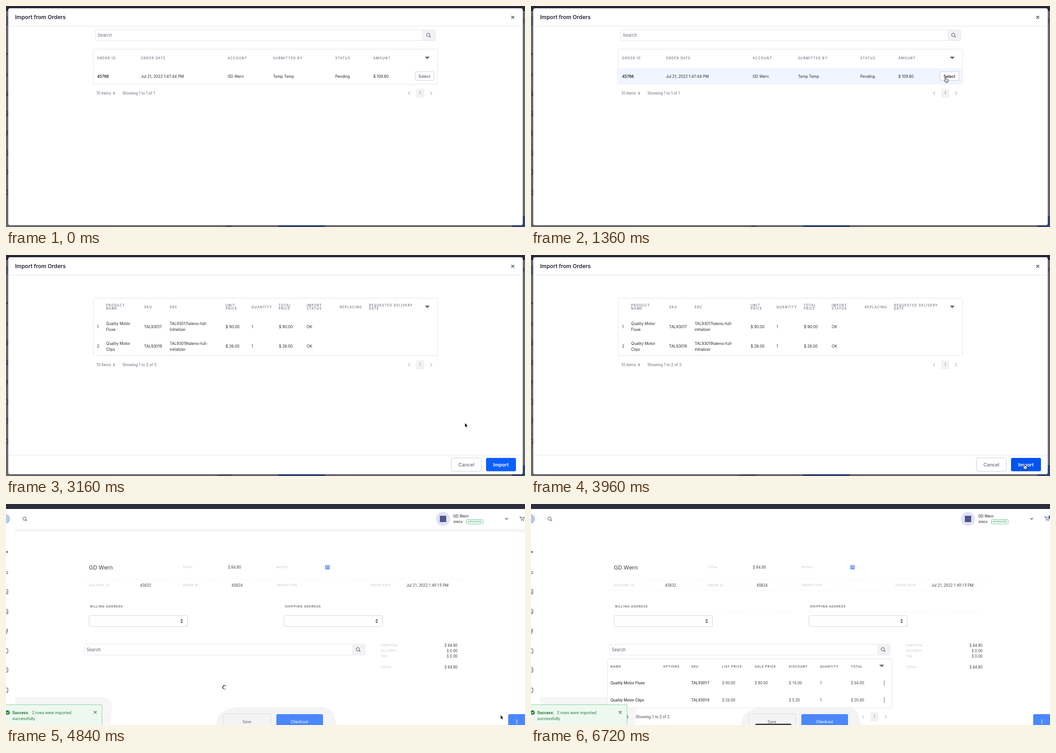
These frames come from a looping animation (1146x489 px, 6800 ms). An HTML page:

```html
<!DOCTYPE html>
<html lang="en">
<head>
<meta charset="utf-8">
<title>Import from orders</title>
<style>
html, body { margin: 0; width: 100%; height: 100%; overflow: hidden; background: #fff; }
svg { display: block; width: 100%; height: 100%; }
text { white-space: pre; }
</style>
</head>
<body>
<svg id="stage" viewBox="0 0 1146 489" preserveAspectRatio="none"></svg>
<script>
const LOOP = 6800;
const INK = '#272833', GRAY = '#6b6c7e', LINE = '#e4e4ea', BLUE = '#4b87ff', GREEN = '#287d3c';
const INTER = 'Inter, sans-serif', ROBOTO = 'Roboto, sans-serif';
const ACCOUNT = 'GD Wern';
const PRODUCTS = [['Quality Motor', 'Fluxe', 'TAL93017'], ['Quality Motor', 'Clips', 'TAL93019']];

// Text is placed by the vertical middle of its capitals.
const text = (x, y, str, size, fill = INK, { weight = 400, font = INTER, gap = 0, anchor = 'start' } = {}) =>
  `<text x="${x}" y="${y + size * 0.36}" font-family="${font}" font-size="${size}" font-weight="${weight}" fill="${fill}" letter-spacing="${gap}" text-anchor="${anchor}">${str}</text>`;
const rect = (x, y, w, h, fill, stroke = 'none', r = 0) =>
  `<rect x="${x}" y="${y}" width="${w}" height="${h}" rx="${r}" fill="${fill}" stroke="${stroke}"/>`;
const path = (d, stroke, width = 1, fill = 'none') =>
  `<path d="${d}" fill="${fill}" stroke="${stroke}" stroke-width="${width}" stroke-linecap="round" stroke-linejoin="round"/>`;
const circle = (x, y, r, fill) => `<circle cx="${x}" cy="${y}" r="${r}" fill="${fill}"/>`;
const group = (id, ...parts) => `<g id="${id}">${parts.join('')}</g>`;

const cell = (x, y, str) => text(x, y, str, 8.4);
const head = (x, y, str) => text(x, y, str, 7, GRAY, { weight: 500, gap: 1.1 });
const heads = (y, list) => list.map(([x, str]) => head(x, y, str)).join('');
const body = (x, y, str, opts = {}) => text(x, y, str, 8.7, '#4a4b55', { font: ROBOTO, ...opts });
const label = (x, y, str) => text(x, y, str, 6.7, '#c3c3ca', { font: ROBOTO, gap: 0.7 });
const caps = (x, y, str) => text(x, y, str, 7, '#5c5d69', { font: ROBOTO, weight: 500, gap: 0.95 });

const magnifier = (x, y) => path(`M${x + 2.3} ${y + 2.3}l2.2 2.2M${x + 3} ${y - .6}a3.6 3.6 0 1 1-7.2 0a3.6 3.6 0 1 1 7.2 0`, '#4f505c', 1.1);
const cross = (x, y, r, color) => path(`M${x - r} ${y - r}l${2 * r} ${2 * r}m0 ${-2 * r}l${-2 * r} ${2 * r}`, color, 1.4);
const triangle = (x, y) => path(`M${x - 4.5} ${y - 2}h9l-4.5 4.5z`, GRAY, 1, GRAY);
const sorter = (x, y, s) => `<path d="M${x - s} ${y - s * .35}h${2 * s}l${-s} ${-s * 1.2}zM${x - s} ${y + s * .35}h${2 * s}l${-s} ${s * 1.2}z" fill="#5c5d69"/>`;
const kebab = (x, y, fill, step = 4) => [-step, 0, step].map(d => circle(x, y + d, 1.1, fill)).join('');
const chevron = (x, y, dir) => path(`M${x - dir * 1.7} ${y - 3.2}l${dir * 3.4} 3.2l${-dir * 3.4} 3.2`, '#85868f', 1);
const pager = (left, mid, right, y, font) =>
  chevron(left, y, -1) + rect(mid - 9, y - 10, 18, 20, '#f1f2f4', 'none', 2) +
  text(mid, y, '1', 8.4, '#85868f', { anchor: 'middle', font }) + chevron(right, y, 1);
const modalPager = (y, n) => text(199.5, y, '10 items', 8.4, GRAY) + sorter(238.5, y, 2) +
  text(257, y, `Showing 1 to ${n} of ${n}`, 8.4, GRAY) + pager(890, 914.5, 939, y, INTER);
const search = (x, y, w, font, size) => rect(x + .5, y + .5, w, 24, '#fff', LINE, 2) +
  rect(x + w - 28.5, y + 1, 28.5, 23, '#f1f2f4') + text(x + 5.5, y + 12.5, 'Search', size, GRAY, { font }) + magnifier(x + w - 15, y + 12.5);
const dashes = (x1, x2, y) => `<path d="M${x1} ${y}H${x2}" stroke="#f2f2f4" stroke-dasharray="14 7"/>`;

function sidebar() {
  const sheet = y => path(`M-4 ${y - 5}h6q2 0 2 2v6q0 2-2 2h-6`, '#45464f', 1.1);
  return path('M-2 110l5-5m-3 0h3.4v3M-2 151q3-4 5-1t0 4h-5M-2 277h5.5v4H-2m4 0v5h-5', '#45464f', 1.1) +
    [194, 238, 325, 367, 412].map(sheet).join('') +
    path('M-1 194h3m-3 2h3M-1 238h3m-3 2h3M-1 367h3', '#45464f', .9);
}

function page() {
  const totals = [['SUBTOTAL', '84.80', 313], ['DELIVERY', '0.00', 325], ['TAX', '0.00', 337], ['TOTAL', '84.80', 361]];
  const select = x => rect(x + .5, 247, 217, 24, '#fff', '#d3d3d9', 2) + sorter(x + 205, 259, 3);
  const row = ([name, kind, sku], y, list, sale, discount, total) =>
    body(175.5, y, `${name} ${kind}`, { weight: 500 }) + body(354, y, sku, { weight: 500 }) + body(422, y, list) +
    body(494, y, sale) + body(569.5, y, discount) + body(638, y, '1') + body(706.5, y, total) + kebab(780, y, '#4f505c');
  return rect(0, 0, 1146, 489, '#fff') + rect(0, 0, 1146, 11, '#2b2d3d') +
    group('strip', rect(20, 55, 1126, 7, '#f5f5f6')) +
    circle(-2, 33, 11, '#b8c8ee') + magnifier(41.5, 33) + sidebar() +
    circle(965, 33, 15.5, '#e0e2f4') + rect(958, 26, 14, 14, '#51558f') +
    text(987.5, 27, ACCOUNT, 8.7, INK, { font: ROBOTO }) + text(987.5, 39.5, '45824', 7.3, INK, { font: ROBOTO }) +
    rect(1016.5, 34.5, 37, 9.5, '#fff', '#5fc58b', 2) +
    text(1035, 39.3, 'APPROVED', 5.7, '#3fae70', { font: ROBOTO, weight: 500, gap: .3, anchor: 'middle' }) +
    path('M1103 31.5l2.5 2.5 2.5-2.5', '#4a4b55', 1.3) +
    path('M1134 28h2l1.6 6h5.5l1.5-4.5h-7.5', '#4a4b55', 1) + circle(1138.5, 36.5, 1, '#4a4b55') + circle(1142.5, 36.5, 1, '#4a4b55') +
    text(183, 140, ACCOUNT, 13.6, '#4a4b55', { font: ROBOTO }) +
    label(390, 140, 'TOTAL') + body(490, 140, '$ 84.80') + label(597.5, 140, 'NOTES') +
    rect(705.5, 136, 8.5, 8, '#cfdfff', '#2f70ee') + path('M707.5 138.5h5m-5 2h5m-5 2h5', '#2f70ee', .9) +
    dashes(175, 1008, 167) + label(183, 179.5, 'ACCOUNT ID') + body(296, 179.5, '43832') +
    label(390, 179.5, 'ORDER ID') + body(498, 179.5, '45824') + label(597.5, 179.5, 'ORDER TYPE') +
    label(804.5, 179.5, 'ORDER DATE') + body(884, 179.5, 'Jul 21, 2022 1:49:15 PM') +
    group('lines', dashes(170, 1000, 191), dashes(183, 580, 238), dashes(613, 1000, 238)) +
    caps(186, 226, 'BILLING ADDRESS') + caps(616, 226, 'SHIPPING ADDRESS') + select(183) + select(613.5) +
    search(172.5, 309.5, 620, ROBOTO, 10.1) +
    totals.map(([name, sum, y]) => label(828, y, name) + body(997, y, `$ ${sum}`, { anchor: 'end' })).join('') +
    path('M20 427H215Q236 430 234 452L230 489H20Z', 'none', 0, '#f6f6f7') +
    group('haze', path('M464 489Q466 466 480 459T510 449H702Q722 454 725 470L730 489Z', 'none', 0, '#f4f4f5')) +
    group('spinner', path('M486 403a4 4 0 1 0-1 6', '#8c8d98', 1.6), path('M482 402a4 4 0 0 0-3 6', '#45464f', 1.8)) +
    group('items', rect(168.5, 343, 629, 108, '#fff', LINE, 2),
      [[175.5, 'NAME'], [292, 'OPTIONS'], [354, 'SKU'], [421.5, 'LIST PRICE'], [494, 'SALE PRICE'], [569.5, 'DISCOUNT'], [638, 'QUANTITY'], [706.5, 'TOTAL']]
        .map(([x, str]) => caps(x, 359.5, str)).join(''),
      triangle(774.5, 358), row(PRODUCTS[0], 396, '$ 90.00', '$ 80.00', '$ 16.00', '$ 64.00'),
      row(PRODUCTS[1], 433.5, '$ 26.00', '', '$ 5.20', '$ 20.80'),
      sorter(213, 471, 2.4), body(231.5, 471, 'Showing 1 to 2 of 2'), pager(733, 758.5, 784, 471, ROBOTO), circle(1147, 29, 4.5, '#3f6fe8')) +
    group('footer', rect(480.5, 464.5, 104, 36, '#f4f4f5', '#d9d9de', 3), text(532, 482, 'Save', 9, GRAY, { font: ROBOTO, anchor: 'middle' }),
      rect(597, 465, 103, 36, BLUE, 'none', 3), text(648, 482, 'Checkout', 9, '#fff', { font: ROBOTO, anchor: 'middle' })) +
    group('more', rect(1109, 465, 60, 40, BLUE, 'none', 3), kebab(1128, 482, '#fff', 3.6)) +
    group('toast', rect(-5, 444, 217, 60, '#edf9f0', '#7fcf95', 2), circle(3.5, 461.5, 5, GREEN), path('M1.4 461.5l1.6 1.7 3-3.4', '#fff', 1.2),
      text(14, 461.5, 'Success:', 9, GREEN, { font: ROBOTO, weight: 700 }), text(57.5, 461.5, '2 rows were imported', 9, GREEN, { font: ROBOTO }),
      text(14, 474.5, 'successfully.', 9, GREEN, { font: ROBOTO }), cross(197, 461, 2.6, GREEN)) +
    group('tip', rect(495, 486, 80, 20, '#43444f', 'none', 3));
}

function ordersView() {
  return group('orders', search(197, 52, 751, INTER, 9.5), rect(193, 95.5, 760, 77.5, '#fff', LINE, 2),
    group('orderHover', rect(190, 138, 763, 35, '#f0f5ff')),
    heads(115, [[201, 'ORDER ID'], [298, 'ORDER DATE'], [489.5, 'ACCOUNT'], [589.5, 'SUBMITTED BY'], [727, 'STATUS'], [811, 'AMOUNT']]),
    triangle(930.5, 114.5), text(201, 155.5, '45766', 8.4, INK, { weight: 600 }),
    cell(298, 155.5, 'Jul 21, 2022 1:47:44 PM'), cell(489.5, 155.5, ACCOUNT), cell(589.5, 155.5, 'Temp Temp'),
    cell(727, 155.5, 'Pending'), cell(811, 155.5, '$ 109.80'), rect(903.5, 145.5, 41.5, 19, '#fff', '#cdced9', 2),
    group('pick', text(924, 155.5, 'Select', 8.5, 'currentColor', { weight: 600, anchor: 'middle' })), modalPager(193, 1));
}

function productsView() {
  const row = ([name, kind, sku], i) => {
    const y = 158.7 + i * 43.5, price = i ? '$ 26.00' : '$ 90.00';
    return cell(201, y, i + 1) + cell(221, y - 6.6, name) + cell(221, y + 6.6, kind) + cell(305, y, sku) +
      cell(361.5, y - 6.6, `${sku}taleno-full-`) + cell(361.5, y + 6.6, 'initializer') +
      cell(485, y, price) + cell(542, y, '1') + cell(602.5, y, price) + cell(664, y, 'OK');
  };
  return group('products', rect(193, 95.5, 760, 127, '#fff', LINE, 2),
    group('productHover', rect(193, 138, 760, 41, '#f0f5ff')),
    group('productRows',
      heads(111.5, [[221, 'PRODUCT'], [485, 'UNIT'], [602, 'TOTAL'], [664, 'IMPORT'], [801.5, 'REQUESTED DELIVERY']]),
      heads(118.7, [[221, 'NAME'], [485, 'PRICE'], [602, 'PRICE'], [664, 'STATUS'], [801.5, 'DATE']]),
      heads(115, [[305, 'SKU'], [361.5, 'ERC'], [542, 'QUANTITY'], [737, 'REPLACING']]), triangle(930.5, 114.5), PRODUCTS.map(row).join('')),
    modalPager(243, 2), path('M5 442.5H1141', LINE),
    rect(983.5, 449, 66, 29.5, '#fff', '#cdced9', 3), text(1016.5, 464, 'Cancel', 10.6, GRAY, { weight: 500, anchor: 'middle' }),
    '<rect id="importRing" x="1058.5" y="447.5" width="69" height="32.5" rx="4" fill="none" stroke="#80acff" stroke-width="2"/>',
    '<rect id="importBox" x="1060" y="449" width="66" height="29.5" rx="3"/>',
    text(1093, 464, 'Import', 10.8, '#fff', { weight: 600, anchor: 'middle' }));
}

const stage = document.getElementById('stage');
stage.innerHTML = page() +
  group('modal', rect(0, 0, 1146, 489, 'rgba(39,40,51,.7)'), '<path id="blob" fill="#505159"/>',
    rect(5, 5, 1136, 480, '#fff', 'none', 4), text(20, 25, 'Import from Orders', 12.1, INK, { weight: 600 }),
    cross(1119, 25, 2.6, INK), path('M5 44.5H1141', LINE), ordersView(), productsView()) +
  group('cursor',
    group('arrow', path('M0 0V9.3L2.2 7.3 3.8 10.8 5.3 10.1 3.8 6.8H6.7Z', '#fff', .7, '#000')),
    group('hand', path('M-1.6 1Q-1.6-.6-.5-.6T.6 1V4Q1.6 3.2 2.4 4.3 3.6 3.8 4 5 5.4 4.8 5.4 6.3 5.4 9.5 4.2 11H-.9Q-1.4 9.2-3.5 7 -4 5.6-2.8 5.4L-1.6 6.4Z', '#111', .9, '#fff'), path('M.9 7v2.3M2.7 7v2.3', '#111', .6)));

const el = {};
stage.querySelectorAll('[id]').forEach(node => { el[node.id] = node; });
const show = (id, on) => { el[id].style.display = on ? '' : 'none'; };
const fade = (id, v) => el[id].setAttribute('opacity', v);
const clamp = v => Math.min(1, Math.max(0, v));
const ramp = (t, a, b) => clamp((t - a) / (b - a));

// time, x, y of the pointer tip
const TRACK = [[720, 606, 454], [1360, 916, 158], [2360, 916, 158], [2840, 965, 318], [3560, 1080, 446],
  [3960, 1090, 463], [4280, 1091, 464], [4800, 1092, 467], [4840, 1092, 467], [5480, 747, 468], [5800, 560, 494]];

function pointer(t) {
  const i = TRACK.findIndex(key => key[0] > t);
  if (i < 1) return TRACK[i ? TRACK.length - 1 : 0].slice(1);
  const [t0, x0, y0] = TRACK[i - 1], [t1, x1, y1] = TRACK[i];
  const k = ramp(t, t0, t1), e = k * k * (3 - 2 * k);
  return [x0 + (x1 - x0) * e, y0 + (y1 - y0) * e];
}

function update(t) {
  const [x, y] = pointer(t), moving = t >= 720 && t < 5800;
  const open = t < 4800, second = t >= 2280, loaded = t >= 5200;
  const onPick = moving && !second && x > 903 && y < 165;
  const onImport = open && second && x > 1060 && y > 449;

  show('modal', open);
  show('orders', !second);
  show('products', second);
  fade('orders', 1 - .65 * ramp(t, 2120, 2240));
  fade('productRows', t < 4440 ? .35 + .65 * ramp(t, 2360, 2800) : 1 - .65 * ramp(t, 4440, 4600));
  show('orderHover', moving && y < 173);
  show('productHover', y < 179);
  el.pick.style.color = onPick ? INK : GRAY;
  el.importBox.setAttribute('fill', onImport ? '#0053f0' : '#0b5fff');
  show('importRing', open && t >= 4440);
  const reach = 30 * ramp(t, 2400, 3600);
  el.blob.setAttribute('d', `M${485 - reach} 489Q${487 - reach} 485 ${492 - reach / 2} 485H498V489Z`);

  show('toast', !open);
  show('strip', !open && !loaded);
  show('items', loaded);
  show('spinner', !open && !loaded);
  el.spinner.setAttribute('transform', `rotate(${(t - 4840) * .36} 482.5 406)`);
  show('lines', t >= 6680);
  el.footer.setAttribute('transform', `translate(${open ? 4 : 0})`);
  el.more.setAttribute('transform', `translate(${open ? 9 : 0})`);
  show('tip', t >= 6200);
  fade('tip', ramp(t, 6160, 6400));

  show('cursor', moving);
  show('hand', onPick || onImport);
  show('arrow', !onPick && !onImport);
  el.cursor.setAttribute('transform', `translate(${x} ${y})`);
}

const start = performance.now();
function frame(now) {
  update(Math.max(0, now - start) % LOOP);
  requestAnimationFrame(frame);
}
update(0);
requestAnimationFrame(frame);
</script>
</body>
</html>
```
